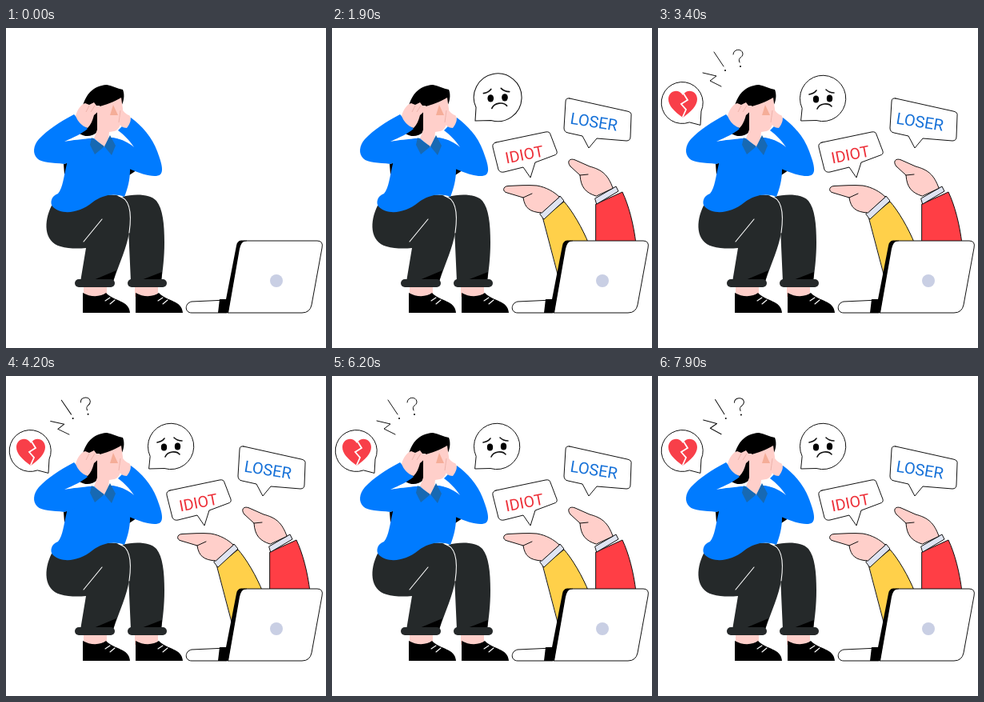
Recreate the animation shown at these times as an HTML page. Size 400 px wide and 400 px high, loop 8000 ms.

```html
<!DOCTYPE html>
<html lang="en">
<head>
<meta charset="utf-8">
<style>
html, body { margin: 0; height: 100%; overflow: hidden; background: #fff; }
svg { display: block; width: 100%; height: 100%; }
.line { stroke: #111; stroke-width: 1; stroke-linejoin: round; stroke-linecap: round; }
.none { fill: none; }
.white { fill: #fff; }
.skin { fill: #ffcfca; }
.blue { fill: #007bff; }
.pants { fill: #25292a; }
.cuff { fill: #dfe4f2; }
.light { fill: none; stroke: #fff; stroke-width: 1.1; stroke-linecap: round; }
text { font-family: Roboto, "Open Sans", sans-serif; }
</style>
</head>
<body>
<svg viewBox="0 0 400 400">
  <g id="woman">
    <!-- right leg, then left leg -->
    <path class="skin" d="M161 320H190V336H161ZM97 320H126V336H97Z"/>
    <path class="pants" d="M145 211C160 207 180 207 188 216C196 226 198 245 198 268C198 287 196 302 194 317H156L153 250Z"/>
    <path d="M195 305L164 317H194Z"/>
    <path class="pants" d="M57 222C47 242 47 267 68 273C78 276 90 276 100 275L93 317H134C142 293 151 275 154 255C157 232 153 213 138 209C115 205 100 222 57 222Z"/>
    <path d="M138 303L107 316H134Z"/>
    <path class="light" d="M141 210C154 213 158 228 154 256M120 239L97 267"/>
    <rect class="pants" x="86" y="314" width="50" height="10" rx="5"/>
    <rect class="pants" x="152" y="314" width="49" height="10" rx="5"/>
    <g id="shoe">
      <path d="M96 331C106 337 119 336 125 331C135 342 154 340 155 356H96Z"/>
      <path class="light" d="M124 341L130 337M130 345L136 340"/>
    </g>
    <use href="#shoe" x="66"/>
    <!-- hair behind the sleeves -->
    <path d="M95 101C99 84 108 72 126 71C133 72 139 76 146 77C149 84 147 94 143 99L120 115L114 130C106 138 92 136 88 127C91 121 94 114 95 101Z"/>
    <!-- sweater -->
    <path d="M72 170L86 166L73 183ZM153 160L166 176L154 184Z"/>
    <path class="blue" d="M104 138C84 141 81 152 76 170C72 186 71 200 65 207C56 210 55 219 58 223C70 235 92 231 108 218C120 209 134 206 148 211C152 201 155 190 155 178V150C150 142 143 139 134 137Z"/>
    <path class="blue" d="M85 108C68 117 51 128 41 139C34 147 33 157 39 163C45 169 58 168 73 170L90 164L107 138C94 139 84 140 73 142C84 137 95 132 102 126Z"/>
    <path class="blue" d="M156 112C170 122 183 137 189 154C193 165 198 178 193 183C187 188 170 183 154 176L136 138C145 139 153 143 160 149C154 140 148 134 140 128Z"/>
    <!-- head and hands -->
    <path class="skin" d="M114 99C125 96 136 92 144 87L146 101C146 114 143 128 135 129L129 130L128 139L123 149L110 138L114 127Z"/>
    <path d="M134 96L130 109H140Z" fill="#f5ad98"/>
    <path class="skin" d="M87 110C89 102 94 95 99 94L104 96L110 93L113 97L117 97L119 101L110 109C108 116 106 121 102 125C94 122 90 117 87 110Z"/>
    <path class="skin" d="M144 101C147 103 149 108 154 109C158 113 155 120 151 125C146 125 143 122 141 119Z"/>
    <path class="none" stroke="#e6a69e" stroke-width=".7" d="M104 97L100 105M111 97L106 105M143 103L141 118"/>
    <path d="M107 137L105 146L111 158L123 148ZM130 134L123 148L132 159L137 147Z" fill="#1769b3"/>
  </g>

  <g id="yellow" class="line">
    <path fill="#ffd04a" d="M264 238L290 217C300 228 313 250 321 270L318 310H283Z"/>
    <path class="cuff" d="M260 232L285 210L290 216L265 239Z"/>
    <path class="skin" d="M262 231C247 230 241 225 239 212L219 206C213 205 213 198 220 197.500C232 197 244 196 256 197C268 199 278 205 284 211Z"/>
    <path class="none" d="M239 212L250 207"/>
  </g>
  <g id="red" class="line">
    <path fill="#ff3e45" d="M330 220L363 205C371 222 377 245 380 270L372 310H330Z"/>
    <path class="cuff" d="M329 213L355 198L358 204L331 220Z"/>
    <path class="skin" d="M330 210C317 206 311 199 310 184L298 173C293 167 297 162 304 165L322 173C337 177 345 183 351 200Z"/>
    <path class="none" d="M310 184L320 183"/>
  </g>

  <g id="laptop">
    <path class="line white" d="M276 340L232 342C223 344 223 356 232 356H276Z"/>
    <path class="line white" d="M300 266H389Q397 266 395 275L382 346Q380 356 370 356H277L291 275Q293 266 300 266Z"/>
    <path d="M299 265.500H294Q289 266 288 272L275 339H267L265 356H278L292 276Q294 267 299 266Z"/>
    <circle cx="338" cy="316" r="8" fill="#c9cfe4"/>
  </g>

  <g id="idiot">
    <path class="line white" d="M205 143L267 130Q272 129 273 133L281 154Q282 158 278 159L254 168L248 187L239 174L215 180Q210 181 208 177L201 149Q200 144 205 143Z"/>
    <text x="218" y="169.500" font-size="19.500" fill="#ed2f38" transform="rotate(-11 218 169.500)">IDIOT</text>
  </g>
  <g id="loser">
    <path class="line white" d="M297 88L369 104Q375 105 374 110L373 136Q373 141 368 141L331 138L321 150L313 135L295 131Q290 130 290 125L292 92Q292 87 297 88Z"/>
    <text x="297" y="119.500" font-size="20" fill="#1671d8" transform="rotate(9 297 119.500)">LOSER</text>
  </g>
  <g id="sad">
    <path class="line white" d="M180 100A28.700 28.700 0 1 1 198 115.500L179 116Z"/>
    <ellipse cx="197.500" cy="89" rx="3.700" ry="4.500"/>
    <ellipse cx="214.500" cy="88" rx="3.700" ry="4.500"/>
    <path class="line none" style="stroke-width:1.600" d="M189 83Q195 82 198 78M210 77Q214 81 220 81M199 101C202 94 213 93 217 98"/>
  </g>
  <g id="heart">
    <path class="line white" d="M39 118A26 26 0 1 1 54 104L53 121Z"/>
    <path fill="#f83f49" d="M31 112C20 104 13 97 13 89C13 78 26 75 31 84C36 75 49 78 49 89C49 97 41 105 31 112Z"/>
    <path class="light" style="stroke-width:1.800" d="M32 82L37 90L29 95L35 102L31 111"/>
  </g>
  <g id="marks">
    <path id="bolt" class="line none" d="M56 56L73 60L65 66L79 73"/>
    <g id="bang"><path class="line none" d="M70 30L82 48"/><circle cx="84" cy="53" r="1"/></g>
    <g id="query"><path class="line none" d="M94 33C94 26 105 25 106 32C106 38 99 36 102 43"/><circle cx="103" cy="48" r="1"/></g>
  </g>
</svg>
<script>
const LOOP = 8000, STEP = 100;

// id, pivot x, pivot y, start ms, length ms
const pops = [
  ["yellow", 300, 310, 50, 500],
  ["red", 352, 310, 300, 550],
  ["idiot", 249, 187, 480, 500],
  ["loser", 321, 150, 980, 600],
  ["sad", 179, 116, 1400, 600],
  ["heart", 53, 121, 1900, 600],
  ["bolt", 79, 73, 2150, 450],
  ["bang", 84, 53, 2250, 450],
  ["query", 103, 48, 2350, 450]
].map(([id, ...rest]) => [document.getElementById(id), ...rest]);
const marks = document.getElementById("marks");

function backOut(p) {
  const q = p - 1;
  return 1 + 3 * q ** 3 + 2 * q ** 2;
}

function draw(now) {
  const t = Math.floor(now % LOOP / STEP) * STEP;
  for (const [el, x, y, start, length] of pops) {
    const p = Math.max(0, Math.min(1, (t - start) / length));
    const s = backOut(p);
    el.style.display = p ? "" : "none";
    el.setAttribute("transform", `translate(${x} ${y}) scale(${s}) translate(${-x} ${-y})`);
  }
  const sway = 2 * Math.sin((t - 3400) / 700 * Math.PI);
  marks.setAttribute("transform", `rotate(${sway} 88 75)`);
}

function tick() {
  draw(performance.now());
  requestAnimationFrame(tick);
}
tick();
</script>
</body>
</html>
```
